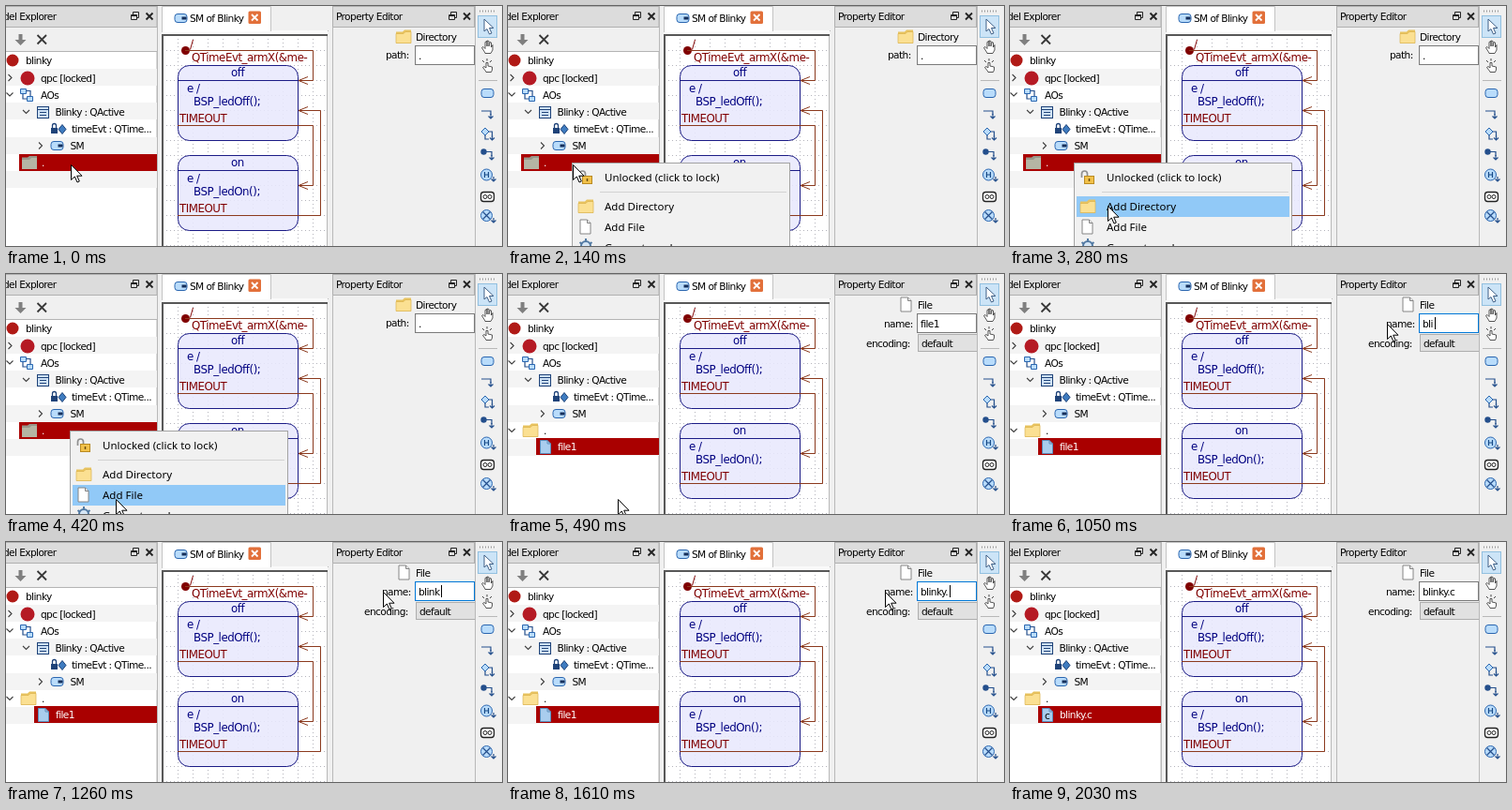
Animation of 529x256 px, one loop 2.1 s. Source, as an HTML page:

```html
<!DOCTYPE html>
<html lang="en">
<head>
<meta charset="utf-8">
<title>Adding a file to a model</title>
<style>
html, body { margin: 0; width: 100%; height: 100%; overflow: hidden; background: #f0f0f0; }
svg { display: block; width: 529px; height: 256px; }
text { white-space: pre; }
.ui { font: 10.6px "DejaVu Sans", sans-serif; letter-spacing: -.6px; fill: #000; }
.model { font: 11.8px "DejaVu Sans", sans-serif; letter-spacing: -.45px; fill: #000080; }
.menu { font: 11.5px "Noto Sans", sans-serif; fill: #000; }
.red { fill: #800000; }
.white { fill: #fff; }
.line { fill: none; stroke: #b8b8b8; }
.title { fill: #dcdcdc; stroke: #b0b0b0; }
.wire { fill: none; stroke: #8b3a1e; }
.chev { fill: none; stroke: #404040; stroke-width: 1.1; }
.blue { fill: #b9dcfb; stroke: #2a66b0; }
.ink { fill: none; stroke: #244f8c; stroke-width: 1.2; }
.dock { fill: none; stroke: #222; }
.hand { fill: #fff; stroke: #444; stroke-width: .9; }
</style>
</head>
<body>
<svg viewBox="0 0 529 256" xmlns="http://www.w3.org/2000/svg">
<defs>
  <pattern id="grid" x="167" y="31" width="16" height="16" patternUnits="userSpaceOnUse">
    <path d="M.5 0V16M0 .5H16" fill="none" stroke="#b4b4bc" stroke-dasharray="1 3"/>
  </pattern>
  <clipPath id="field"><rect x="430" y="40" width="70" height="48"/></clipPath>
  <clipPath id="sheet"><rect x="166" y="30" width="177" height="226"/></clipPath>
  <g id="dockbtn">
    <path class="dock" d="M-1.500-1.500V-4.500H4.500V1.500H2.500M-3.500-1.500H2.500V3.500H-3.500ZM-3.500-.5H2.500"/>
  </g>
  <g id="close"><path d="M-3.500-3.500 3.500 3.500M3.500-3.500-3.500 3.500" stroke="#222" stroke-width="1.800"/></g>
  <g id="folder">
    <path d="M-8-5.500H-1L1-7.500H8V6.500H-8Z" fill="#e8c35f"/>
    <path d="M-8-3.500H0L2-5.500H8V6.500H-8Z" fill="#fbe092" stroke="#dcb44e" stroke-width=".7"/>
  </g>
  <g id="page">
    <path d="M-5.500-7.500H2L5.500-4V7.500H-5.500Z" fill="#fff" stroke="#858585"/>
    <path d="M2-7.500V-4H5.500" fill="#e4e4e4" stroke="#858585"/>
  </g>
  <g id="state"><rect class="blue" x="-6.500" y="-4.500" width="13" height="9" rx="3"/></g>
  <g id="machine">
    <use href="#state"/>
    <rect x="1" y="-1.500" width="5" height="3" fill="#16305c"/>
  </g>
  <g id="out"><path class="ink" d="M-3-3V2M-5.500-.5-3 2-.5-.5"/></g>
</defs>

<rect width="529" height="256" fill="#f0f0f0"/>

<!-- model explorer -->
<rect class="title" x="-1" y=".5" width="162" height="22"/>
<text class="ui" x="-3" y="15">del Explorer</text>
<use href="#dockbtn" x="137" y="11"/>
<use href="#close" x="153" y="11"/>
<path d="M13.500 30H17.500V36H21.500L15.500 42 9.500 36H13.500Z" fill="#808080"/>
<path d="M33.500 31 43 40.500M43 31 33.500 40.500" stroke="#383838" stroke-width="1.800"/>
<rect x="-1" y="48.500" width="162" height="210" fill="#fff" stroke="#b4b4b4"/>
<path d="M0 67H161V85H0ZM0 103H161V121H0ZM0 140H161V158H0ZM0 176H161V194H0Z" fill="#f4f4f4"/>
<circle cx="7" cy="58" r="6.500" fill="#b01a16"/>
<circle cx="23" cy="77" r="7.500" fill="#b51a24"/>
<path class="chev" d="M2.500 73 6 76.500 2.500 80M.5 92.500 4 96 7.500 92.500M18 111 21.500 114.500 25 111M35 145.500 38.500 149 35 152.500"/>
<path class="blue" d="M15.500 88.500H21.500V93.500H15.500ZM22.500 96.500H28.500V101.500H22.500Z"/>
<path class="ink" d="M21.500 90.500H26V96M18 94V99H22"/>
<rect x="33.500" y="107.500" width="12" height="12" fill="#cfe2f7" stroke="#1f4379"/>
<path d="M33.500 110.500H45.500M36 113.500H43M36 116.500H43" stroke="#1f4379"/>
<path d="M49.500 130V127.500A2 2 0 0 1 53.500 127.500V130" fill="none" stroke="#1f4379" stroke-width="1.300"/>
<rect x="48" y="130" width="7" height="6" fill="#1f4379"/>
<path d="M60 126.500 64 131.500 60 136.500 56 131.500Z" fill="#3f7cc0" stroke="#1f4379"/>
<use href="#machine" x="54.500" y="149"/>
<text class="ui" x="21" y="62">blinky</text>
<text class="ui" x="37" y="80.500">qpc [locked]</text>
<text class="ui" x="37" y="98.500">AOs</text>
<text class="ui" x="52.500" y="116.500">Blinky : QActive</text>
<text class="ui" x="70" y="134.500">timeEvt : QTime...</text>
<text class="ui" x="68.500" y="153">SM</text>
<g id="dirRow">
  <rect x="14" y="158" width="147" height="18" fill="#a90000"/>
  <path d="M17 161.500H23L25 160H33V174H17Z" fill="#97978a"/>
  <path d="M17 164H25L27 162H33V174H17Z" fill="#b5b5a4"/>
  <text class="ui white" x="38" y="171">.</text>
</g>
<g id="fileRow">
  <path class="chev" d="M.5 165 4 168.500 7.500 165"/>
  <use href="#folder" x="24" y="167"/>
  <text class="ui" x="38" y="171">.</text>
  <rect x="30" y="175" width="131" height="18" fill="#a90000"/>
  <path d="M34.500 177.500H42L45.500 181V191.500H34.500Z" fill="#a9cdee" stroke="#5d8fbd"/>
  <path d="M42 177.500V181H45.500" fill="none" stroke="#5d8fbd"/>
  <text class="ui" id="cMark" x="37" y="189">c</text>
  <text class="ui white" id="rowName" x="53" y="188"></text>
</g>

<!-- diagram -->
<path class="line" d="M161.500 0V256M282 26.500H344"/>
<path d="M166 26H343V32H166Z" fill="#fafafa"/>
<path d="M166.500 28V.5H282.500V27" fill="#fff" stroke="#c4c4c4"/>
<use href="#machine" x="186.500" y="13"/>
<text class="ui" x="196" y="16.500">SM of Blinky</text>
<rect x="258.500" y="5.500" width="13.500" height="13.500" rx="1.500" fill="#e2703a"/>
<path d="M262 9 268.500 15.500M268.500 9 262 15.500" stroke="#fff" stroke-width="1.800"/>
<g clip-path="url(#sheet)">
  <rect x="166" y="30" width="177" height="226" fill="#fff"/>
  <rect x="167" y="31" width="175" height="225" fill="url(#grid)"/>
  <path d="M167 256V31H343" fill="none" stroke="#585858" stroke-width="2"/>
  <path class="line" d="M342.500 32V256"/>
  <g id="states"></g>
  <circle cx="191.500" cy="47.500" r="4.500" fill="#800000"/>
  <path class="wire" d="M191 47.500H327.500V79.500H312M183 127.500H327.500V191.500H312M183 223.500H335.500V111.500H312"/>
  <path class="wire" d="M322 75.500 312 79.500 322 83.500M322 187.500 312 191.500 322 195.500M322 107.500 312 111.500 322 115.500"/>
  <text class="model red" x="196" y="45">/</text>
  <text class="model red" x="198" y="59">QTimeEvt_armX(&amp;me-</text>
</g>

<!-- property editor -->
<rect class="title" x="348.500" y=".5" width="151" height="22"/>
<text class="ui" x="352" y="15">Property Editor</text>
<use href="#dockbtn" x="476" y="11"/>
<use href="#close" x="491.500" y="11"/>
<path class="line" d="M348.500 22V256M500.500 0V256"/>
<g id="dirProps">
  <use href="#folder" x="424" y="33"/>
  <text class="ui" x="437" y="37">Directory</text>
  <text class="ui" x="405" y="56">path:</text>
</g>
<g id="fileProps">
  <use href="#page" x="424.500" y="32.500"/>
  <text class="ui" x="437" y="37">File</text>
  <text class="ui" x="401" y="56.500">name:</text>
  <text class="ui" x="382" y="77.500">encoding:</text>
  <g clip-path="url(#field)">
    <rect x="437.500" y="64.500" width="70" height="18" fill="#e1e1e1" stroke="#adadad"/>
    <text class="ui" x="441" y="77.500">default</text>
  </g>
</g>
<g clip-path="url(#field)">
  <rect id="box" x="436.500" y="42.500" width="63" height="20" fill="#fff"/>
  <rect id="mark" x="440" y="46" width="22" height="13" fill="#0078d7"/>
  <text class="ui" id="value" x="440" y="56.500"></text>
  <path id="caret" d="M.5 46V59" stroke="#000"/>
</g>

<!-- tool bar -->
<path d="M505 5.500H523" stroke="#999" stroke-width="2" stroke-dasharray="1 2"/>
<rect x="503.500" y="10.500" width="20" height="23" fill="#cce4f7" stroke="#92c0e0"/>
<path d="M510 14V27L513 24.500 515.500 30 518 29 515.500 23.500H520Z" fill="#fff" stroke="#3f5f86"/>
<path class="hand" d="M511 50 507.500 44.500 509 43.500 511 45.500V38.500L513 37.500V43 37L515 37.500V43L516 38.500 517.500 39V44L519 41.500V47L517 50.500H511Z"/>
<path class="hand" d="M512 70 508.500 65.500 510 64.500 512 66V60.500H514V64L518.500 65V68L517.500 70.500H512Z"/>
<path d="M513 56V58.500M508 58 510 60M518 58 516 60" stroke="#444"/>
<path class="line" d="M504 79.500H524"/>
<use href="#state" x="513.500" y="93"/>
<path class="ink" d="M507 112H517V116"/>
<use href="#out" x="520" y="118"/>
<path class="blue" d="M511 130 515 134 511 138 507 134Z"/>
<path class="ink" d="M515 134H518.500V140M511 138V142H515"/>
<use href="#out" x="521.500" y="141"/>
<circle cx="509.500" cy="155.500" r="3.200" fill="#244f8c"/>
<path class="ink" d="M512 155.500H518V160"/>
<use href="#out" x="521" y="162"/>
<circle class="blue" cx="512.500" cy="180" r="6"/>
<path d="M510.500 177V183M514.500 177V183M510.500 180H514.500" stroke="#174a86" stroke-width="1.200"/>
<use href="#out" x="523" y="185"/>
<rect x="506.500" y="198.500" width="14" height="10" rx="3" fill="#fff" stroke="#222" stroke-width="1.300"/>
<g fill="none" stroke="#222"><circle cx="511" cy="203.500" r="2"/><circle cx="516" cy="203.500" r="2"/></g>
<circle class="blue" cx="512.500" cy="223.500" r="6"/>
<path class="ink" d="M508.500 219.500 516.500 227.500M516.500 219.500 508.500 227.500"/>
<use href="#out" x="523" y="229"/>

<!-- context menu -->
<g id="popup">
  <rect x="68.500" y="167.500" width="232" height="100" fill="#f1f1f1" stroke="#a3a3a3"/>
  <rect id="hover" x="71" width="227" height="22" fill="#91c9f7"/>
  <path d="M98 198.500H297" stroke="#d2d2d2"/>
  <path d="M76.500 183V179A3 3 0 0 1 82.500 179V181" fill="none" stroke="#8f8f8f" stroke-width="1.700"/>
  <rect x="79.500" y="181.500" width="10" height="8" fill="#f2c14a" stroke="#b98a22"/>
  <path d="M84.500 184V187" stroke="#6b4d10" stroke-width="1.500"/>
  <use href="#folder" x="83" y="214"/>
  <use href="#page" x="82.500" y="235.500"/>
  <circle cx="83" cy="256" r="5" fill="#d6e6f5" stroke="#527aa3" stroke-width="2"/>
  <path d="M83 248V251M76.500 252 79 254M89.500 252 87 254" stroke="#527aa3" stroke-width="2"/>
  <text class="menu" x="103" y="187">Unlocked (click to lock)</text>
  <text class="menu" x="103" y="218">Add Directory</text>
  <text class="menu" x="103" y="240">Add File</text>
  <text class="menu" x="103" y="262">Generate code</text>
</g>

<path id="arrow" d="M.5 .5V16.500L4.300 13 7 19 9.300 18 6.700 12.200H12Z" fill="#fff" stroke="#000"/>
<path id="beam" d="M-3 .5H-1Q0 .5 0 2Q0 .5 1 .5H3M0 2V14M-3 15.500H-1Q0 15.500 0 14Q0 15.500 1 15.500H3" fill="none" stroke="#000"/>
</svg>

<script>
const LOOP = 2100;
const $ = id => document.getElementById(id);
const show = (id, on) => { $(id).style.display = on ? '' : 'none'; };
const move = (id, x, y) => $(id).setAttribute('transform', `translate(${x} ${y})`);

const stateBox = (y, name, action) => `
  <g transform="translate(0 ${y})">
    <rect x="183.500" y=".5" width="128" height="80" rx="12" fill="#e9e9fd" fill-opacity=".88" stroke="#1c1c86"/>
    <path d="M183.500 16.500H311.500" stroke="#1c1c86"/>
    <text class="model" x="247" y="12" text-anchor="middle">${name}</text>
    <text class="model" x="193" y="29">e /</text>
    <text class="model" x="200" y="43">${action}</text>
    <text class="model red" x="185" y="61">TIMEOUT</text>
  </g>`;
$('states').innerHTML = stateBox(63, 'off', 'BSP_ledOff();') + stateBox(159, 'on', 'BSP_ledOn();');

// each step changes only what it names
const steps = [
  { t: 0, at: [69, 169], menu: false, hover: 0, file: false, value: '.', row: '',
    border: '#7a7a7a', caret: false, marked: false, beam: false },
  { t: 140, menu: true },
  { t: 210, at: [88, 194] },
  { t: 280, at: [104, 213], hover: 203 },
  { t: 350, at: [112, 229], hover: 225 },
  { t: 420, at: [117, 240] },
  { t: 490, menu: false, file: true, value: 'file1', row: 'file1' },
  { t: 630, at: [190, 194] },
  { t: 700, at: [345, 92] },
  { t: 770, at: [467, 45], beam: true, border: '#171717' },
  { t: 910, at: [402, 53], beam: false, border: '#0078d7', marked: true },
  { t: 980, value: 'bl', marked: false, caret: true },
  { t: 1050, value: 'bli' },
  { t: 1120, value: 'blin' },
  { t: 1260, value: 'blink' },
  { t: 1400, value: 'blinky' },
  { t: 1610, value: 'blinky.' },
  { t: 1750, value: 'blinky.c' },
  { t: 1820, caret: false },
  { t: 1890, row: 'blinky.c' },
  { t: 2030, at: null, border: '#7a7a7a' }
];

function draw(time) {
  const s = Object.assign({}, ...steps.filter(step => step.t <= time));
  show('popup', s.menu);
  show('hover', s.hover);
  $('hover').setAttribute('y', s.hover);
  show('dirRow', !s.file);
  show('dirProps', !s.file);
  show('fileRow', s.file);
  show('fileProps', s.file);
  show('cMark', s.row.endsWith('.c'));
  $('rowName').textContent = s.row;
  $('value').textContent = s.value;
  $('value').style.fill = s.marked ? '#fff' : '#000';
  show('mark', s.marked);
  $('box').setAttribute('stroke', s.border);
  show('caret', s.caret);
  move('caret', Math.round(442 + $('value').getComputedTextLength()), 0);
  show('arrow', s.at && !s.beam);
  show('beam', s.at && s.beam);
  if (s.at) move(s.beam ? 'beam' : 'arrow', ...s.at);
}

function tick() {
  draw(performance.now() % LOOP);
  requestAnimationFrame(tick);
}
tick();
</script>
</body>
</html>
```
